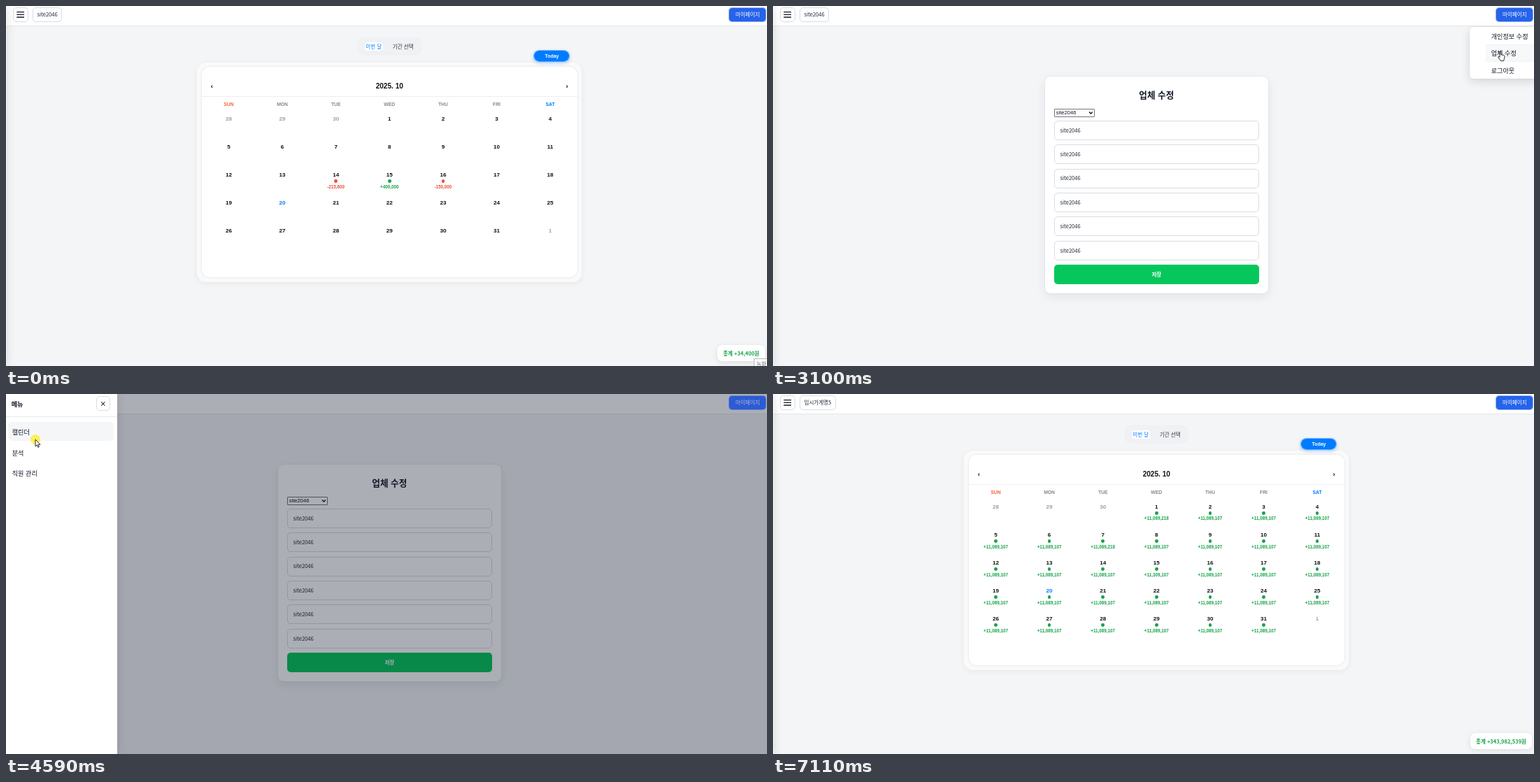
An HTML page for the animation above (7770 ms loop, 1088 by 515 pixels).

```html
<!DOCTYPE html>
<html lang="ko">
<head>
<meta charset="utf-8">
<title>Calendar demo</title>
<style>
html, body { margin: 0; width: 100%; height: 100%; overflow: hidden; }
body { position: relative; background: #f4f5f7; color: #111827;
  font: 500 7.5px/20px "Noto Sans CJK KR", "Noto Sans KR", "Noto Sans CJK", sans-serif; }
div, span, svg { position: absolute; box-sizing: border-box; white-space: pre; }
.big { font-size: 9.15px; font-weight: 400; }
.title { font-size: 12.6px; font-weight: 700; }
.bold { font-weight: 700; }
.num { font-family: "Liberation Sans", Arial, sans-serif; font-weight: 700; }
.edge { background: #fff; border: 1px solid #d9dce2; border-radius: 5px; }
.card { background: #fff; border-radius: 7px; box-shadow: 0 5px 15px rgba(15,23,42,.08), 0 0 1px rgba(15,23,42,.2); }
.pop { background: #fff; border-radius: 5px; box-shadow: 0 4px 13px rgba(0,0,0,.13), 0 0 1px rgba(0,0,0,.25); }
.save { background: #06c75c; border-radius: 5px; }
#site { left: 38px; top: 2px; height: 21px; padding: 0 5.5px; line-height: 18px; color: #1f2937; }
#total { right: 3px; top: 485px; height: 23px; padding: 0 8px; line-height: 23px; font-weight: 700;
  color: #16a34a; background: #fff; border-radius: 7px; box-shadow: 0 2px 8px rgba(0,0,0,.1); }
#shade { inset: 0; background: rgba(15,23,42,.35); backdrop-filter: blur(.5px); }
#drawer { left: 0; top: 0; width: 158.5px; height: 100%; background: #fff; box-shadow: 0 0 12px rgba(0,0,0,.13); }
.pill { background-clip: padding-box; border: 1px solid; }
#mine { background-color: #2563eb; border-color: rgba(37,99,235,.5); color: #fff; border-radius: 5px; }
#mine.dim { background-color: #2d5bd3; color: #a9b6d9; }
#today { background-color: #007bff; border-color: rgba(0,123,255,.5); border-radius: 9px;
  box-shadow: 0 2px 5px rgba(0,123,255,.3); }
#cursor { left: 0; top: 0; overflow: visible; }
#cursor path { fill: #fff; stroke: #111; stroke-width: .9; stroke-linejoin: round; }
</style>
</head>
<body>
<script>
const LOOP = 7770, SITE = 'site2046', SITE2 = '임시가게명5';
const GREEN = '#16a34a', RED = '#ef4a3c', BLUE = '#007bff';

const box = (x, y, w, h, cls = '', css = '', inner = '', id = '') =>
  `<div id="${id}" class="${cls}" style="left:${x}px;top:${y}px;width:${w}px;height:${h}px;${css}">${inner}</div>`;
const group = (id, inner) => `<div id="${id}" style="left:0;top:0;width:1088px">${inner}</div>`;
const text = (x, y, str, cls = '', css = '') =>
  `<span class="${cls}" style="left:${x}px;top:${y - (/num/.test(cls) ? 9.4 : 10.5)}px;${css}">${str}</span>`;
const mid = (x, y, str, cls = '', css = '') =>
  text(x - 100, y, str, cls, 'width:200px;text-align:center;' + css);
const num = (x, y, str, size, color = '#111') =>
  mid(x, y, str, 'num', `font-size:${size}px;color:${color}`);

const colX = i => 318.5 + 76.6 * i;
const rowY = r => 161 + 40.1 * r;

function entry(day, amount) {
  const i = day + 2, x = colX(i % 7), y = rowY(Math.floor(i / 7));
  const color = amount < 0 ? RED : GREEN;
  return box(x - 2.4, y + 6.9, 4.8, 4.8, '', `border-radius:50%;background:${color}`) +
    num(x, y + 16.8, (amount > 0 ? '+' : '') + amount.toLocaleString('en-US'), 6.3, color);
}

function calendar() {
  let s = box(504, 46, 89, 23, '', 'background:#eff1f5;border-radius:8px;box-shadow:0 0 3px rgba(0,0,0,.06)') +
    box(512.5, 51.5, 26.5, 12.5, '', 'background:#fff;border-radius:4px') +
    mid(525.7, 58, '이번 달', '', 'color:' + BLUE) + mid(567.7, 58, '기간 선택', '', 'color:#333') +
    box(273, 81, 550, 314, '', 'background:#fafafa;border-radius:13px;box-shadow:0 2px 8px rgba(0,0,0,.06)') +
    box(280, 87, 537, 301, '', 'background:#fff;border-radius:11px;box-shadow:0 0 3px rgba(0,0,0,.12)') +
    box(280, 129, 537, 1, '', 'background:#eee') +
    box(754, 63, 52, 17, 'pill', '', '', 'today') +
    num(780.5, 71.2, 'Today', 6.9, '#fff') + num(548.3, 114, '2025. 10', 10.1) +
    num(294.3, 114, '‹', 9.5) + num(802, 114, '›', 9.5);
  ['SUN', 'MON', 'TUE', 'WED', 'THU', 'FRI', 'SAT'].forEach((d, i) =>
    s += num(colX(i), 140.3, d, 6.8, i == 0 ? '#f0663a' : i == 6 ? BLUE : '#888'));
  for (let i = 0; i < 35; i++) {
    const day = i < 3 ? 28 + i : (i - 3) % 31 + 1;
    const color = i < 3 || i == 34 ? '#a0a0a0' : day == 20 ? BLUE : '#111';
    s += num(colX(i % 7), rowY(Math.floor(i / 7)), day, 8.1, color);
  }
  let many = '';
  for (let d = 1; d <= 31; d++)
    many += entry(d, d == 15 ? 11309107 : d == 1 || d == 7 ? 11089218 : 11089107);
  return s + group('few', entry(14, -215600) + entry(15, 400000) + entry(16, -150000)) + group('many', many);
}

const field = (x, y, w, str) => box(x, y, w, 28, 'edge') + text(x + 8.5, y + 14.3, str, '', 'color:#1f2937');
const save = (x, y, w) => box(x, y, w, 27.5, 'save') + mid(548.3, y + 14, '저장', 'bold', 'color:#fff');

const profile = box(429, 101, 239, 255, 'card') + mid(548.3, 127, '개인정보 수정', 'title') +
  [['ID', SITE], ['이름', 'w1'], ['전화번호 (숫자만)', '12']].map(([label, value], i) =>
    text(442.5, 152.5 + 54.6 * i, label, 'big') + field(442, 164 + 55 * i, 213, value)).join('') +
  save(442, 314.5, 213);

const company = box(389, 101, 319, 310, 'card') + mid(548.3, 127, '업체 수정', 'title') +
  box(402, 147, 58, 11.5, '', 'background:#fff;border:1px solid #767676;border-radius:1px') +
  text(404.7, 152.4, SITE, 'num', 'font-weight:400;font-size:7.6px') +
  '<svg style="left:451px;top:150px" width="7" height="6"><path d="M1 1.5 3.4 4 5.8 1.5" fill="none" stroke="#111" stroke-width="1.3"/></svg>' +
  [0, 1, 2, 3, 4, 5].map(i => field(402, 163.7 + 34.4 * i, 292.5, SITE)).join('') +
  save(402, 370, 292.5);

const header = box(0, 0, 1088, 29, '', 'background:#fff;border-bottom:1px solid #e5e7eb') +
  box(10, 2, 22, 21, 'edge', '', '', 'burger') +
  '<svg style="left:15px;top:7px" width="12" height="11"><path d="M.3 1.6H11M.3 5.3H11M.3 9H11" stroke="#111827" stroke-width="1.3"/></svg>' +
  '<div id="site" class="edge"></div>';

const userMenu = box(996, 30, 100, 74, 'pop') +
  box(1019, 30.5, 69, 24.5, '', 'background:#f7f8fa', '', 'hover') +
  [55, 79].map(y => box(1019, y, 69, 1, '', 'background:#f2f3f5')).join('') +
  ['개인정보 수정', '업체 수정', '로그아웃'].map((s, i) => text(1026.7, 43.2 + 24.5 * i, s, 'big')).join('');

const siteMenu = box(39, 26, 125, 129, 'pop') + box(42.5, 108, 118, 21, '', 'background:#e0f2fe') +
  ['푸른글방모임', SITE2, '꼭 눌러본 기록장부', SITE, '+ 새 사업장 등록'].map((s, i) =>
    text(49.5, 51.2 + 22.5 * i, s, 'big', i == 3 ? 'color:#4a7288' : '')).join('');

const drawer = text(7.7, 14.9, '메뉴', 'big bold') + box(128.5, 3, 20.5, 21, 'edge') +
  mid(138.7, 14, '×', 'bold', 'font-size:9px') + box(0, 32, 158.5, 1, '', 'background:#e5e7eb') +
  box(3, 40, 151, 27, '', 'background:#f5f6f8;border-radius:5px', '', 'itemHover') +
  ['캘린더', '분석', '직원 관리'].map((s, i) => text(8.7, 54.3 + 29.8 * i, s, 'big')).join('');

document.body.innerHTML = header + group('calendar', calendar()) + '<div id="total"></div>' +
  group('profile', profile) + group('company', company) + group('userMenu', userMenu) + group('siteMenu', siteMenu) +
  '<div id="shade"></div>' + box(1033, 2, 54, 21, 'pill', '', mid(26.3, 9.5, '마이페이지'), 'mine') +
  `<div id="drawer">${drawer}</div>` +
  box(1069, 504, 24, 16, '', 'background:#fafafa;border:1px solid #bbb;color:#777', text(3, 7.5, '녹화'), 'tip') +
  `<svg id="cursor" width="12" height="16"><circle id="press" r="7" fill="#ffec1a" opacity=".7"/>
   <path id="arrow" d="M0 0V10l2.3-2.1 1.5 3.4 1.6-.7L3.9 7.3H7Z"/>
   <path id="hand" d="M-.9 0Q0-1 .9 0V4.6L4.6 5.4Q6.2 5.8 6 7.4L5.5 10.5 4.6 13.3H.4L-2.8 8.8Q-3.7 7.2-2.4 7L-.9 8.2Z"/></svg>`;

const $ = id => document.getElementById(id);

// Pointer track: time, x, y
const track = [[460, 1055, 62], [890, 1060, 13], [1230, 1060, 13], [1600, 1045, 39], [2570, 1045, 39],
  [2900, 1040, 65], [3360, 1040, 65], [3920, 15.5, 14.5], [4180, 15.5, 14.5], [4500, 42, 65], [4940, 42, 65],
  [5140, 60, 13], [5220, 60, 13], [5360, 68, 42], [5619, 68, 42], [5620, 72, 49], [5830, 76, 74],
  [6890, 76, 74], [7110, 1040, 342]];

const smooth = p => { p = Math.min(1, Math.max(0, p)); return p * p * (3 - 2 * p); };
const show = (id, on) => $(id).style.display = on ? '' : 'none';

function pointer(t) {
  const i = Math.max(1, track.findIndex(k => k[0] > t));
  const [a, ax, ay] = track[i - 1], [b, bx, by] = track[i];
  const p = smooth((t - a) / (b - a));
  return [ax + (bx - ax) * p, ay + (by - ay) * p];
}

function draw(t) {
  const during = (a, b) => t >= a && t < b;
  const any = list => list.some(([a, b]) => during(a, b));
  const home = !during(1700, 4660), second = t >= 5960, dim = during(4110, 4660);

  show('tip', t < 70);
  show('calendar', home);
  show('total', home);
  show('profile', during(1700, 3090));
  show('company', during(3090, 4660));
  show('few', !second);
  show('many', t >= 6170);
  $('site').textContent = second ? SITE2 : SITE;
  $('total').textContent = `총계 +${t >= 6170 ? '343,982,539' : second ? '0' : '34,400'}원`;

  show('userMenu', during(1030, 3430));
  show('hover', during(1400, 3430));
  $('hover').style.top = (t < 2750 ? 30.5 : 55.5) + 'px';
  show('siteMenu', during(5220, 5960));
  $('burger').style.background = during(3900, 4660) ? '#eef1f5' : '#fff';

  show('shade', dim);
  $('mine').classList.toggle('dim', dim);
  show('itemHover', t >= 4390);
  const open = t < 4110 ? 0 : t < 4600 ? smooth((t - 4080) / 250) : 1 - smooth((t - 4600) / 130);
  $('drawer').style.transform = `translateX(${158.5 * (open - 1)}px)`;

  const live = during(460, 7110);
  show('cursor', live);
  if (!live) return;
  const [x, y] = pointer(t);
  $('cursor').style.transform = `translate(${x}px,${y}px)`;
  const hand = any([[740, 1270], [1400, 3430], [3880, 4110], [5060, 5960]]);
  show('hand', hand);
  show('arrow', !hand);
  show('press', any([[890, 1030], [1600, 1700], [2990, 3090], [3980, 4110], [4520, 4660], [5140, 5220], [5840, 5960]]));
}

const start = performance.now();
function frame(now) {
  draw(Math.max(0, now - start) % LOOP);
  requestAnimationFrame(frame);
}
draw(0);
requestAnimationFrame(frame);
</script>
</body>
</html>
```
